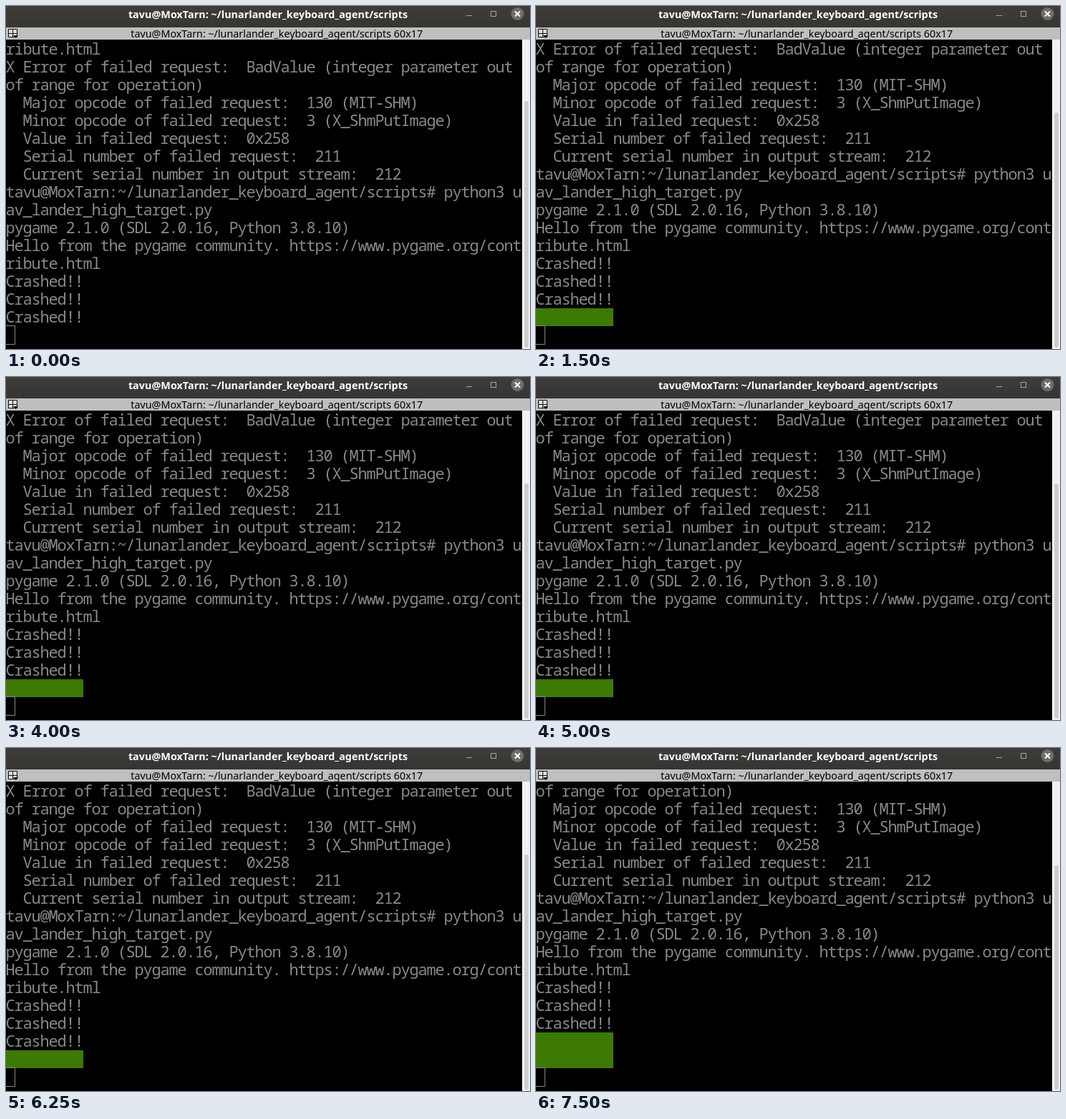
An HTML page for the animation above (8000 ms loop, 732 by 480 pixels).

```html
<!DOCTYPE html>
<html lang="en">
<head>
<meta charset="utf-8">
<title>Terminal</title>
<style>
  html, body { margin: 0; width: 100%; height: 100%; overflow: hidden; background: #000; }
  svg { display: block; width: 732px; height: 480px; }
  .bar { font-family: "Noto Sans", sans-serif; text-anchor: middle; }
  .term text {
    font: 22px "Noto Sans Mono", monospace;
    letter-spacing: -1.2px; /* 12px character cells */
    white-space: pre;
    fill: #888;
    transform: translateX(-.6px); /* centre glyphs in their cells */
  }
  .term .done text { fill: #25292b; animation: blink 8s step-end infinite; }
  .done rect { fill: #3c7a03; }
  #lines { animation: scroll 8s step-end infinite; }
  .first { animation: first 8s step-end infinite; }
  .second { animation: second 8s step-end infinite; }
  .thumb { animation: thumb 8s step-end infinite; }

  @keyframes scroll {
    0% { transform: translateY(0); }
    6.25% { transform: translateY(-25px); }
    87.5%, 100% { transform: translateY(-50px); }
  }
  @keyframes first {
    0% { visibility: hidden; }
    6.25%, 100% { visibility: visible; }
  }
  @keyframes second {
    0% { visibility: hidden; }
    87.5%, 100% { visibility: visible; }
  }
  @keyframes thumb {
    0% { y: 133px; height: 345px; }
    6.25% { y: 149px; height: 329px; }
    87.5%, 100% { y: 164px; height: 314px; }
  }
  @keyframes blink {
    0%, 6.25%, 18.75%, 34.375%, 50%, 62.5%, 78.125%, 93.75%, 100% { opacity: 0; }
    12.5%, 25%, 40.625%, 56.25%, 71.875%, 87.5% { opacity: 1; }
  }
</style>
</head>
<body>
<svg viewBox="0 0 732 480">
  <defs>
    <linearGradient id="head" x2="0" y2="1">
      <stop stop-color="#3f3d39"/>
      <stop offset="1" stop-color="#373531"/>
    </linearGradient>
    <clipPath id="screen"><rect y="48" width="721" height="432"/></clipPath>
  </defs>

  <g class="term" clip-path="url(#screen)">
    <g id="lines">
      <g class="done first"><rect y="448" width="108" height="25"/><text y="468">Success!!</text></g>
      <g class="done second"><rect y="473" width="108" height="25"/><text y="493">Success!!</text></g>
    </g>
  </g>
  <path d="M0 447.5h12.5v26h-12.5" fill="none" stroke="#888"/>

  <rect x="721" y="47" width="11" height="433" fill="#f2f1f0"/>
  <rect class="thumb" x="724" y="133" width="6" height="345" rx="3" fill="#cfcdcb"/>

  <rect width="732" height="30" fill="url(#head)"/>
  <text class="bar" x="366" y="17" font-size="14.4" font-weight="700" fill="#fff">tavu@MoxTarn: ~/lunarlander_keyboard_agent/scripts</text>
  <g fill="none" stroke="#aaa8a4">
    <path d="M643 13.5h8"/>
    <rect x="677.5" y="7.5" width="7" height="7"/>
  </g>
  <circle cx="714.5" cy="11" r="9" fill="#6f6d69"/>
  <path d="M711 7.5l7 7m0-7l-7 7" stroke="#fff" stroke-width="2"/>

  <rect y="30" width="732" height="17" fill="#c0bebf"/>
  <path d="M3.5 32.5h12v11h-12zM9.5 32.5v11M3.5 38.5h12" fill="#dedcdd" stroke="#111"/>
  <path d="M10 41h7l-3.5 4z" fill="#111"/>
  <text class="bar" x="378.2" y="44" font-size="14.3" fill="#000">tavu@MoxTarn: ~/lunarlander_keyboard_agent/scripts 60x17</text>
</svg>
<script>
  const output = `ribute.html
X Error of failed request:  BadValue (integer parameter out
of range for operation)
  Major opcode of failed request:  130 (MIT-SHM)
  Minor opcode of failed request:  3 (X_ShmPutImage)
  Value in failed request:  0x258
  Serial number of failed request:  211
  Current serial number in output stream:  212
tavu@MoxTarn:~/lunarlander_keyboard_agent/scripts# python3 u
av_lander_high_target.py
pygame 2.1.0 (SDL 2.0.16, Python 3.8.10)
Hello from the pygame community. https://www.pygame.org/cont
ribute.html
Crashed!!
Crashed!!
Crashed!!`;
  const lines = document.getElementById('lines');
  output.split('\n').forEach((line, row) => {
    const text = document.createElementNS(lines.namespaceURI, 'text');
    text.setAttribute('y', 68 + 25 * row);
    text.textContent = line;
    lines.append(text);
  });
</script>
</body>
</html>
```
